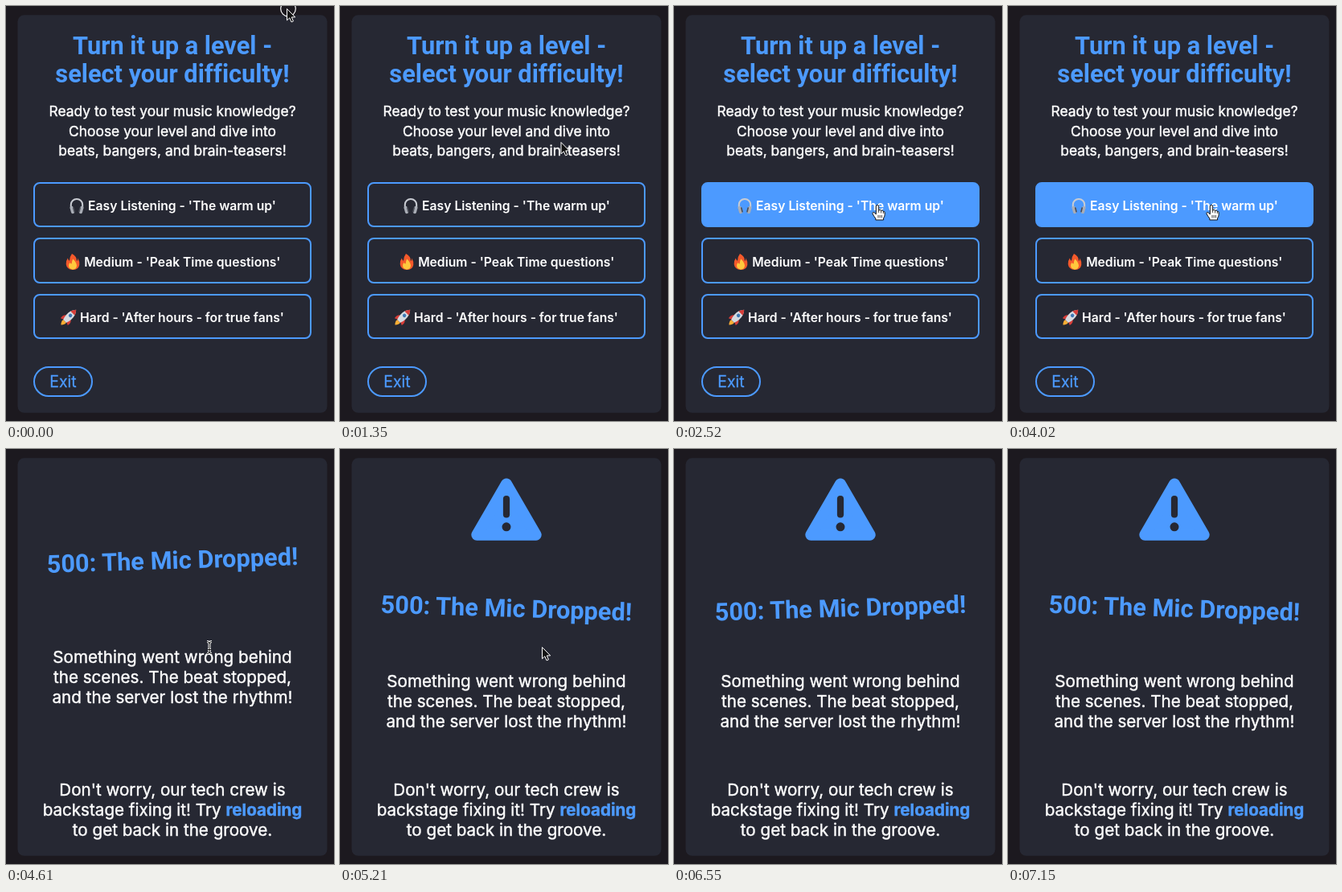
An HTML page that plays this animation: 408 px wide and 516 px high, repeating every 7250 ms.

```html
<!DOCTYPE html>
<html lang="en">
<head>
<meta charset="utf-8">
<title>Music quiz</title>
<style>
  :root { --blue: #4c9aff; --panel: #262833; }
  html, body { margin: 0; width: 100%; height: 100%; overflow: hidden; background: #1c191f; }
  svg { display: block; width: 408px; height: 516px; }
  text {
    font-family: Inter, "Liberation Sans", sans-serif; font-optical-sizing: none;
    text-anchor: middle; fill: #fff;
  }
  .title {
    font: 700 30.75px Roboto, "Liberation Sans", sans-serif;
    font-variant-ligatures: none; fill: var(--blue);
  }
  /* a hairline stroke gives the heavier body text */
  .lead, .note { stroke: #fff; stroke-width: .4; }
  .lead { font-size: 17.42px; }
  .note { font-size: 20.62px; }
  .label { font-size: 15.68px; font-weight: 600; }
  .exit { font-size: 19.4px; fill: var(--blue); stroke: var(--blue); stroke-width: .3; }
  .link { font-weight: 700; fill: var(--blue); stroke: var(--blue); }
  .box { fill: none; stroke: var(--blue); stroke-width: 2; }
  .panel { fill: var(--panel); }
  #hover { fill: var(--blue); }
  .hidden { display: none; }
</style>
</head>
<body>
<svg viewBox="0 0 408 516">
  <rect class="panel" x="14.5" y="11.3" width="385" height="494.5" rx="8"/>

  <g id="menu">
    <text class="title" x="207" y="60">Turn it up a level -</text>
    <text class="title" x="207" y="95">select your difficulty!</text>
    <text class="lead" x="207" y="137">Ready to test your music knowledge?</text>
    <text class="lead" x="207" y="161.5">Choose your level and dive into</text>
    <text class="lead" x="207" y="186">beats, bangers, and brain-teasers!</text>

    <rect id="hover" x="35" y="220" width="344" height="54" rx="7"/>
    <rect class="box" x="35" y="220" width="344" height="54" rx="7"/>
    <rect class="box" x="35" y="289" width="344" height="55" rx="7"/>
    <rect class="box" x="35" y="359" width="344" height="54" rx="7"/>
    <rect class="box" x="35" y="449" width="72" height="36" rx="18"/>

    <!-- headphones -->
    <g transform="translate(88 248.5)" fill="none" stroke-linecap="round">
      <path d="M-7.2 3V-1.5A7.2 7 0 0 1 7.2-1.5V3" stroke="#c9ccd3" stroke-width="2"/>
      <path d="M-6.3 2.5L-5 7.5M6.3 2.5L5 7.5" stroke="#a9adb6" stroke-width="4.2"/>
      <path d="M-4.2 2.5L-3 7.2M4.2 2.5L3 7.2" stroke="#4a4d57" stroke-width="1.6"/>
    </g>
    <!-- flame -->
    <g transform="translate(83 318)">
      <path d="M-1-10Q5-7 5-1Q6.5-2 6.3-4.5Q9 0 8.3 4Q7 10 0 10Q-7.5 9.5-8.3 3Q-8.7-1-6.2-4.5Q-5.6-2-4-1.3Q-3.8-6.5-1-10Z" fill="#f4592b"/>
      <path d="M.3-3.5Q4.8 1 5 5Q4.4 9.6 0 9.7Q-4.8 9.2-5 4.6Q-4.7 2-3.4 1Q-2.7 2.5-1.4 2.6Q-1.2-1 .3-3.5Z" fill="#ffc83d"/>
    </g>
    <!-- rocket -->
    <g transform="translate(78 387) rotate(45)">
      <path d="M-2.6 7Q-3.2 10.5 0 13.5Q3.2 10.5 2.6 7Z" fill="#ffae34"/>
      <path d="M-3.5 0Q-7.5 2.5-6.3 8L-3 6.5H3L6.3 8Q7.5 2.5 3.5 0Z" fill="#d63d38"/>
      <path d="M0-13Q5-8 4.3 0Q4 4.5 2.6 7H-2.6Q-4 4.5-4.3 0Q-5-8 0-13Z" fill="#d5dae1"/>
      <path d="M0-13Q2.7-10.3 3.7-7H-3.7Q-2.7-10.3 0-13Z" fill="#d63d38"/>
      <circle cy="-3" r="2.2" fill="#3e79b4"/>
    </g>

    <text class="label" x="219" y="253.7">Easy Listening - 'The warm up'</text>
    <text class="label" x="219.3" y="323.5">Medium - 'Peak Time questions'</text>
    <text class="label" x="219" y="393">Hard - 'After hours - for true fans'</text>
    <text class="exit" x="71" y="474">Exit</text>
  </g>

  <g id="error">
    <g id="warning">
      <path d="M207 43.5L243.7 106.7H170.3Z" fill="#4c9aff" stroke="#4c9aff" stroke-width="14" stroke-linejoin="round"/>
      <rect class="panel" x="202.9" y="58" width="8.2" height="27.5" rx="4.1"/>
      <circle class="panel" cx="207" cy="96.8" r="5.5"/>
    </g>
    <g id="headline"><text class="title" y="11">500: The Mic Dropped!</text></g>
    <g id="cause">
      <text class="note" x="207" y="266">Something went wrong behind</text>
      <text class="note" x="207" y="291">the scenes. The beat stopped,</text>
      <text class="note" x="207" y="316">and the server lost the rhythm!</text>
    </g>
    <text class="note" x="207" y="431">Don't worry, our tech crew is</text>
    <text class="note" x="207" y="456">backstage fixing it! Try <tspan class="link">reloading</tspan></text>
    <text class="note" x="207" y="481">to get back in the groove.</text>
  </g>

  <circle id="ring" r="9.3" fill="none" stroke="#fff" stroke-width="1.2"/>
  <g id="pointer">
    <path id="arrow" d="M0 0V14.3L3.3 11.3L5.5 16.4L7.9 15.4L5.8 10.4H10.2Z" fill="#111" stroke="#fff"/>
    <g id="hand" stroke="#111" stroke-linejoin="round">
      <path d="M-1.7 1.7Q-1.7 0 0 0T1.7 1.7V7Q2 5.8 3.2 5.9T4.6 7.3Q5 6.3 6 6.5T7.3 8Q9 7.2 9.2 9.4V12Q9 14.5 7.6 16.2V18.5H-2.2V16.6Q-4 14.5-5.6 11.6Q-6.6 9.6-5.4 9Q-4 8.6-1.7 11.4Z" fill="#fff"/>
      <path d="M1.7 7V9.5M4.6 7.5V10M7.3 8V10.5M1 12.5V16M3.2 12.5V16M5.4 12.5V16" fill="none" stroke-width=".8"/>
    </g>
    <g id="beam" fill="none">
      <path id="stem" d="M-3-7.5Q0-7.5 0-5Q0-7.5 3-7.5M0-5V5M-3 7.5Q0 7.5 0 5Q0 7.5 3 7.5M-2 2.5H2"/>
      <use href="#stem" stroke="#fff" stroke-width="3"/>
      <use href="#stem" stroke="#111"/>
    </g>
  </g>
</svg>

<script>
  const LOOP = 7250, ERROR_AT = 4610, ICON_AT = 4910;
  const TICK = 150, SWAY = 400, SWAY_FROM = 4575;
  const $ = id => document.getElementById(id);

  // time, shape, x, y
  const pointerPath = [
    [0, 'arrow', 349.5, 3.5], [150, 'arrow', 356, 5], [300, 'arrow', 354, -6], [450, 'none', 0, 0],
    [1350, 'arrow', 275, 169.5], [1490, 'arrow', 274, 177], [1640, 'arrow', 271, 193],
    [1790, 'arrow', 266, 212], [1940, 'hand', 261, 230], [2080, 'hand', 257, 241],
    [2230, 'hand', 255, 246], [2370, 'hand', 253.5, 248.3], [2520, 'hand', 253, 247.5],
    [4310, 'beam', 253, 247], [ICON_AT, 'arrow', 251.5, 246.5],
    [6250, 'arrow', 251.5, 250], [6400, 'none', 0, 0]
  ];
  // time, fill opacity of the first button
  const hoverSteps = [[0, 0], [1940, 0.45], [2080, 1]];
  // start, end, x, y
  const clicks = [[0, 150, 351, 3.5], [3870, 4020, 253.5, 245.5]];

  const latest = (steps, t) => steps.filter(s => s[0] <= t).pop();
  const show = (id, on) => $(id).classList.toggle('hidden', !on);
  const move = (id, x, y, angle = 0) =>
    $(id).setAttribute('transform', `translate(${x} ${y}) rotate(${angle})`);

  function drawHeadline(t, raised) {
    // the swing advances in held ticks
    const held = 4600 + Math.floor((t - 4600) / TICK) * TICK;
    const angle = -1.95 * Math.cos((held - SWAY_FROM) / SWAY * 2 * Math.PI);
    move('headline', 207, raised ? 138 : 197.6, angle);
  }

  function draw(t) {
    const failed = t >= ERROR_AT, raised = t < ICON_AT;
    show('menu', !failed);
    show('error', failed);
    show('warning', !raised);
    move('cause', 0, raised ? 0 : 30);
    drawHeadline(t, raised);
    $('hover').style.opacity = latest(hoverSteps, t)[1];

    const [, shape, x, y] = latest(pointerPath, t);
    for (const id of ['arrow', 'hand', 'beam']) show(id, id === shape);
    move('pointer', x, y);

    const click = clicks.find(([from, to]) => t >= from && t < to);
    show('ring', Boolean(click));
    if (click) move('ring', click[2], click[3]);
  }

  const start = performance.now();
  function frame() {
    draw((performance.now() - start) % LOOP);
    requestAnimationFrame(frame);
  }
  frame();
</script>
</body>
</html>
```
